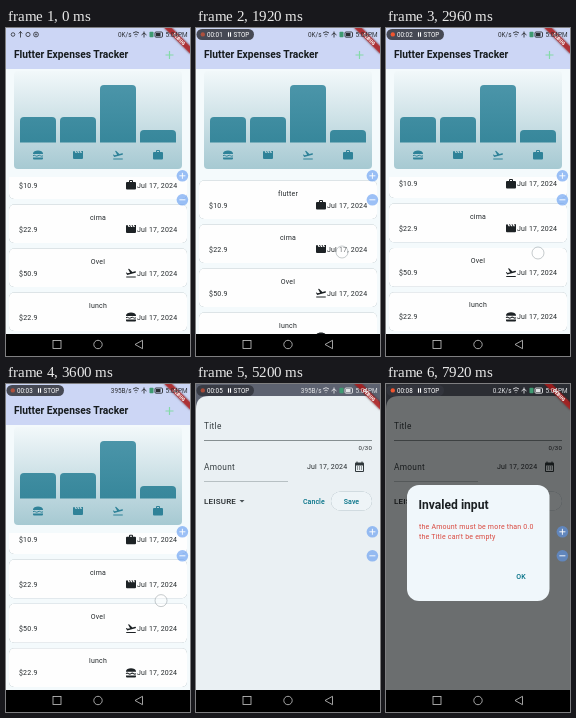
Recreate the animation shown at these times as an HTML page. Size 184 by 328 pixels, loop 8000 ms.

```html
<!DOCTYPE html>
<html lang="en">
<head>
<meta charset="utf-8">
<title>Expenses tracker</title>
<style>
  html, body { margin: 0; height: 100%; overflow: hidden; background: #000; }
  svg { display: block; width: 100vw; height: 100vh; font-family: Roboto, sans-serif; }
  .body { font-size: 7px; letter-spacing: .2px; fill: #24292c; }
  .label { font-size: 8.3px; letter-spacing: .3px; fill: #353d40; }
  .action { font-size: 7px; font-weight: 500; letter-spacing: .05px; fill: #007086; }
  .status { font-size: 6.4px; }
  .card { fill: #fefefe; filter: drop-shadow(0 .6px .6px rgba(0, 45, 60, .45)); }
  .banner { filter: drop-shadow(0 0 1.3px rgba(0, 0, 0, .5)); }
  .error { fill: #d9483f; }
  .mid { text-anchor: middle; }
  .end { text-anchor: end; }
</style>
</head>
<body>
<svg id="stage" viewBox="0 0 184 328" xmlns="http://www.w3.org/2000/svg"></svg>
<script>
const LOOP = 8000;
const BOTTOM = 306;

const icons = {
  food: '<path d="M2 9c0-4 5-6 10-6s10 2 10 6v1H2zM2 17h20v2a2 2 0 0 1-2 2H4a2 2 0 0 1-2-2z"/>' +
        '<path d="M2 13.5q2.5-2 5 0t5 0 5 0 5 0" fill="none" stroke="currentColor" stroke-width="2"/>',
  movie: '<path d="M18 4l2 4h-3l-2-4h-2l2 4h-3l-2-4H8l2 4H7L5 4H4a2 2 0 0 0-2 2v12a2 2 0 0 0 2 2h16a2 2 0 0 0 2-2V4z"/>',
  plane: '<path d="M2.5 19h19v2h-19zM22 9.6c-.2-.8-1-1.3-1.8-1.1L14.9 10 8 3.6l-1.9.5 4.1 7.2-5 1.3-2-1.5-1.4.4 2.6 4.5L21 11.5c.8-.3 1.2-1.1 1-1.9z"/>',
  work: '<path fill-rule="evenodd" d="M20 6h-4V4a2 2 0 0 0-2-2h-4a2 2 0 0 0-2 2v2H4a2 2 0 0 0-2 2v11a2 2 0 0 0 2 2h16a2 2 0 0 0 2-2V8a2 2 0 0 0-2-2zm-6 0h-4V4h4z"/>',
  calendar: '<path fill-rule="evenodd" d="M3 5a2 2 0 0 1 2-2h1V1h2v2h8V1h2v2h1a2 2 0 0 1 2 2v15a2 2 0 0 1-2 2H5a2 2 0 0 1-2-2zm2 4v11h14V9z"/>' +
            '<path d="M7 11h2v2H7zm4 0h2v2h-2zm4 0h2v2h-2zm-8 4h2v2H7zm4 0h2v2h-2zm4 0h2v2h-2z"/>'
};

const icon = (name, x, y, color, size = 12) =>
  `<g transform="translate(${x - size / 2} ${y - size / 2}) scale(${size / 24})" fill="${color}" color="${color}">${icons[name]}</g>`;
const text = (x, y, value, cls, extra = '') => `<text x="${x}" y="${y}" class="${cls}" ${extra}>${value}</text>`;
const rect = (x, y, w, h, fill, r = 0, extra = '') =>
  `<rect x="${x}" y="${y}" width="${w}" height="${h}" rx="${r}" fill="${fill}" ${extra}/>`;

const bars = [['food', 89], ['movie', 89], ['plane', 57], ['work', 102]];
const expenses = [
  ['flutter', '$10.9', 'work'], ['cima', '$22.9', 'movie'],
  ['Ovel', '$50.9', 'plane'], ['lunch', '$22.9', 'food']
];

const chart = rect(8, 43, 168, 98, 'url(#shade)', 4) + bars.map(([name, top], i) => {
  const x = 14 + i * 40;
  return `<path d="M${x} 114.5V${top + 4}q0-4 4-4h28q4 0 4 4V114.5z" fill="url(#bar)"/>` + icon(name, x + 18, 127, '#2f8298');
}).join('');

const cards = expenses.map(([title, amount, name], i) => {
  const y = 152.5 + i * 44;
  return `<rect x="3" y="${y}" width="178" height="38.5" rx="5" class="card"/>` +
    text(92, y + 15, title, 'body mid') + text(13, y + 27, amount, 'body') +
    icon(name, 125, y + 24.5, '#1d2225') + text(131, y + 27, 'Jul 17, 2024', 'body');
}).join('');

const sheetBody = `
  <path d="M0 ${BOTTOM}V25q0-13 13-13h158q13 0 13 13V${BOTTOM}z" fill="#eaf0f3"/>
  ${text(8, 44.7, 'Title', 'label')}
  ${rect(8, 56, 168, .8, '#6d777a')}
  ${text(176, 66, '0/30', 'body end', 'style="font-size:6px"')}
  ${text(8, 85.5, 'Amount', 'label')}
  ${rect(8, 97, 84, .7, '#a3acaf')}
  ${text(111, 85.3, 'Jul 17, 2024', 'body')}
  ${icon('calendar', 163.5, 83, '#30383b')}
  ${text(8, 119.7, 'LEISURE', 'body', 'style="font-size:8px;font-weight:500"')}
  <path d="M43.5 116h5l-2.5 2.6z" fill="#4a5356"/>
  ${text(107, 119.6, 'Cancle', 'action')}
  <rect x="135" y="107.5" width="41" height="19" rx="9.5" class="card" style="fill:#eef4f7"/>
  ${text(155.5, 119.6, 'Save', 'action mid')}`;

const dialogBody = `
  ${rect(0, 0, 184, BOTTOM, '#000', 0, 'fill-opacity=".54"')}
  ${rect(21, 101, 142.5, 116, '#f0f7fb', 12)}
  ${text(32.5, 125, 'Invaled input', '', 'font-size="12.1" font-weight="700" fill="#1b2023"')}
  ${text(33, 145.3, 'the Amount must be more than 0.0', 'body error')}
  ${text(33, 155.3, 'the Title can\'t be empty', 'body error')}
  ${text(135, 195.3, 'OK', 'action mid')}`;

const fab = (y, upright) => `<circle cx="176.4" cy="${y}" r="5.8" fill="#5a96f0" fill-opacity=".6"/>
  <path d="M173.4 ${y}h6${upright ? `M176.4 ${y - 3}v6` : ''}" stroke="#fff" stroke-opacity=".9"/>`;

const stage = document.getElementById('stage');
stage.innerHTML = `
  <defs>
    <linearGradient id="shade" x2="0" y2="1"><stop stop-color="#f2f8fa"/><stop offset="1" stop-color="#a6c9d2"/></linearGradient>
    <linearGradient id="bar" gradientUnits="userSpaceOnUse" x2="0" y1="57" y2="114"><stop stop-color="#4b95a9"/><stop offset="1" stop-color="#37879b"/></linearGradient>
    <clipPath id="viewport"><rect y="149" width="184" height="157"/></clipPath>
  </defs>
  ${rect(0, 0, 184, BOTTOM, '#f4fafc')}
  ${rect(0, 0, 184, 41, '#ccd6f5')}
  ${text(8, 30.2, 'Flutter Expenses Tracker', '', 'font-size="10.25" font-weight="700" fill="#171c1f"')}
  <circle id="splash" cx="163.5" cy="27" fill="#7fbfc0"/>
  <path d="M159.500 27h8M163.500 23v8" stroke="#84d9a8" stroke-width="1.2"/>
  ${chart}
  <g clip-path="url(#viewport)"><g id="list">${cards}</g></g>
  <rect id="scrim" width="184" height="${BOTTOM}"/>
  <g id="sheet">${sheetBody}</g>
  <g id="dialog">${dialogBody}</g>
  <g transform="translate(184 0) rotate(45)">
    ${rect(-18.4, 12.7, 36.8, 5.5, '#b71c1c', 0, 'class="banner" fill-opacity=".8"')}
    ${text(0, 17.1, 'DEBUG', 'mid', 'font-size="4.7" font-weight="900" fill="#fff"')}
  </g>
  <g id="status" class="status">
    <g id="notices" fill="none" stroke="currentColor" stroke-width=".8">
      <circle cx="7" cy="6.5" r="1.8"/><path d="M14.5 3.5v6M12.800 5.500l1.700-2 1.700 2"/>
      <circle cx="22" cy="6.5" r="2.1"/><circle cx="30" cy="6.5" r="2.4"/><circle cx="30" cy="6.5" r=".7"/>
    </g>
    <g id="pill">
      ${rect(.5, 1, 57.5, 11, '#34363e', 5.5, 'fill-opacity=".88"')}
      <circle id="dot" cx="6.8" cy="6.4" r="2.2" fill="#f0552f"/>
      <text id="timer" x="11" y="8.7" fill="#fff" font-size="6.3"></text>
      <path d="M32.5 4.2v4.5M34.5 4.2v4.5" stroke="#fff" stroke-width="1.1"/>
      ${text(37.5, 8.7, 'STOP', '', 'fill="#fff" font-size="6.3"')}
    </g>
    <text id="speed" x="125.500" y="8.700" class="end" fill="currentColor"></text>
    <g fill="none" stroke="currentColor" stroke-width=".9">
      <path d="M127 5q3-2.6 6 0M128.300 6.800q1.700-1.500 3.400 0M130 8.300v.8"/>
      <path d="M138 3.500v6M135.500 7l2.500-2 2.500 2"/>
      <rect x="149" y="4" width="7.500" height="5.200" rx="1"/>
    </g>
    ${rect(143.5, 3.8, 4, 5.4, '#3f9a72', .8)}
    ${rect(150, 5, 4.5, 3.2, 'currentColor')}
    ${text(181.5, 8.7, '5:04PM', 'end', 'fill="currentColor"')}
  </g>
  ${fab(147.8, true)}${fab(171.8, false)}
  ${rect(0, BOTTOM, 184, 22, '#000')}
  <g fill="none" stroke="#c9c9c9" stroke-width=".8">
    <rect x="47" y="312.5" width="8" height="8"/><circle cx="92" cy="316.5" r="4.2"/><path d="M136.500 312.300v8.400l-7.500-4.200z"/>
  </g>
  <circle id="touch" r="6" fill="#fff" fill-opacity=".35" stroke="#7d878c" stroke-opacity=".55" stroke-width=".8"/>`;

const $ = Object.fromEntries([...stage.querySelectorAll('[id]')].map(el => [el.id, el]));
const set = (el, attrs) => Object.entries(attrs).forEach(([name, value]) => el.setAttribute(name, value));
const clamp = v => Math.min(1, Math.max(0, v));
const progress = (t, from, to) => clamp((t - from) / (to - from));
const smooth = p => p * p * (3 - 2 * p);
const within = (t, from, to) => t >= from && t < to;

// Eased value through [time, value] points.
function track(t, points) {
  let value = points[0][1];
  for (let i = 1; i < points.length; i++) {
    const [from] = points[i - 1], [to, next] = points[i];
    value += (next - points[i - 1][1]) * smooth(progress(t, from, to));
  }
  return value;
}

function touchPoint(t) {
  if (within(t, 160, 3950)) return {
    cx: track(t, [[160, 166], [1120, 160], [1920, 146], [2960, 152], [3900, 156]]),
    cy: track(t, [[160, 222], [1120, 196], [1920, 224], [2350, 245], [2960, 225], [3900, 214]])
  };
  if (within(t, 4400, 4680)) return { cx: 163.5, cy: 27 };
  if (within(t, 5680, 6400)) return { cx: 160, cy: 118 };
  return null;
}

function draw(t) {
  const scroll = track(t, [[1280, 20], [1780, 0], [2350, 0], [2820, 20]]);
  const stretch = track(t, [[80, 0], [1080, .02], [1120, .02], [1320, 0], [2820, 0], [2960, .007], [3300, .013], [4000, 0]]);
  set($.list, { transform: `translate(0 ${BOTTOM}) scale(1 ${1 + stretch}) translate(0 ${-BOTTOM - scroll})` });

  const splash = progress(t, 4400, 4720);
  set($.splash, { r: 4 + 5 * splash, opacity: .36 * Math.min(1, splash * 3) * (1 - progress(t, 4760, 4960)) });

  const open = progress(t, 4740, 4950);
  set($.scrim, { opacity: .54 * open });
  set($.sheet, { transform: `translate(0 ${294 * (1 - open) ** 3})`, visibility: open ? 'visible' : 'hidden' });
  set($.dialog, { opacity: progress(t, 6490, 6640) });

  const recording = t >= 480;
  set($.pill, { visibility: recording ? 'visible' : 'hidden' });
  set($.notices, { visibility: recording ? 'hidden' : 'visible' });
  set($.status, { color: open > .5 ? '#e2e4e7' : '#2b2e33' });
  set($.dot, { opacity: within(t % 1680, 160, 320) ? .6 : 1 });
  $.timer.textContent = '00:0' + Math.max(0, Math.floor((t - 665) / 906));
  $.speed.textContent = t < 3600 ? '0K/s' : t < 5360 ? '395B/s' : t < 7040 ? '0.92K/s' : '0.2K/s';

  const point = touchPoint(t);
  set($.touch, { visibility: point ? 'visible' : 'hidden', ...point });
}

const start = performance.now();
function tick() {
  draw((performance.now() - start) % LOOP);
  requestAnimationFrame(tick);
}
tick();
</script>
</body>
</html>
```
